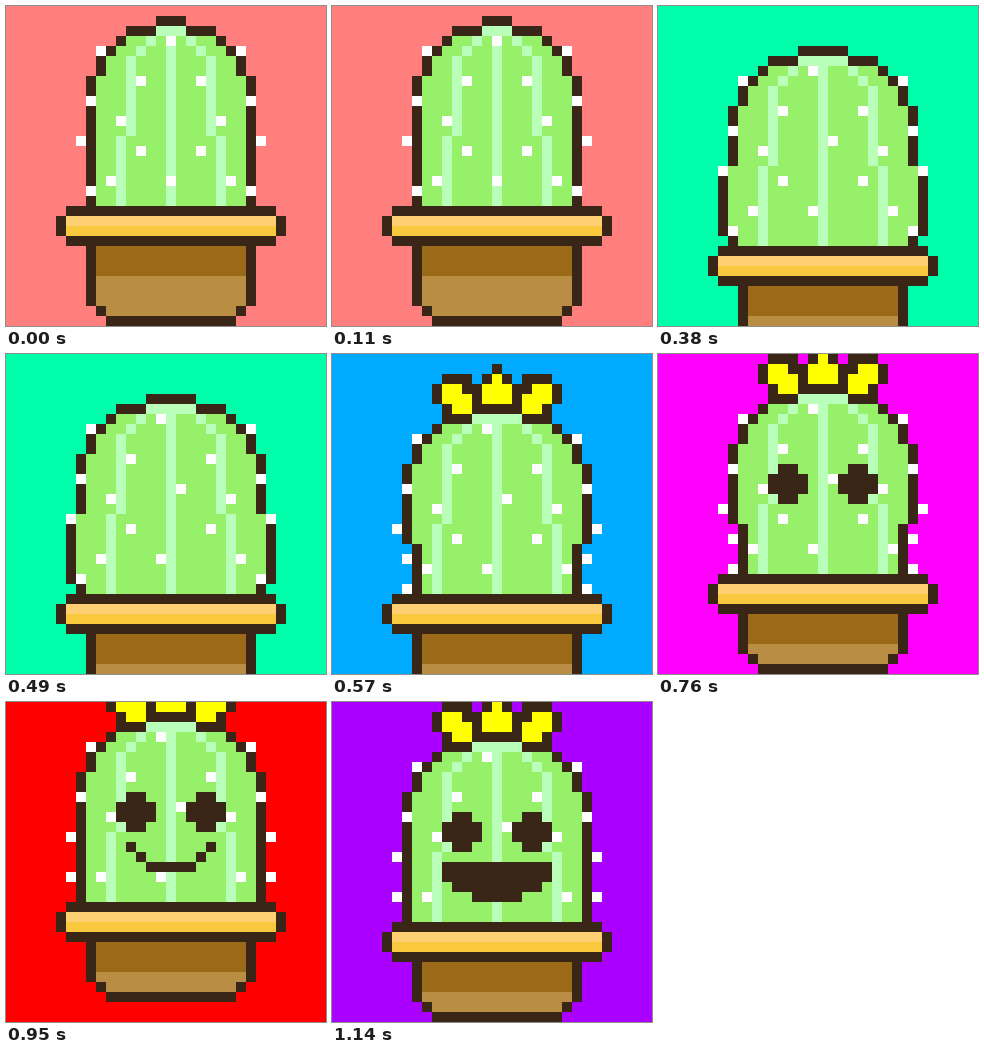
An HTML page with a canvas for the animation above (1.33 s loop, 320 by 320 pixels).

```html
<!DOCTYPE html>
<html lang="en">
<head>
<meta charset="utf-8">
<title>Dancing cactus</title>
<style>
  html, body { margin: 0; width: 100%; height: 100%; overflow: hidden; }
  canvas { display: block; width: 320px; height: 320px; }
</style>
</head>
<body>
<canvas id="stage" width="320" height="320"></canvas>
<script>
const ctx = document.getElementById('stage').getContext('2d');
ctx.scale(10, 10);

const STEP = 190;
const MID = 16;
const DARK = '#3a2616', GREEN = '#96f06a', LIGHT = '#b9ffba', WHITE = '#ffffff';
const YELLOW = '#ffff00', RIM_TOP = '#ffcf73', RIM_LOW = '#f9c83c';
const POT_TOP = '#9b6a18', POT_LOW = '#ba8d44';

// top: first row of the body, crown: half width of its tip, rim: top row of the pot,
// hip: edge offset by row below the top, low: lowest spines as [offset, row]
const straight = () => 0;
const bulge = r => (r > 10 && r < 18 ? 1 : 0);
const waist = r => (r > 12 ? -1 : 0);

const poses = [
  { bg: '#ff7f7f', top: 2, crown: 1, rim: 20, pot: 8, hip: straight, low: [[8, 16]] },
  { bg: '#ff5500', top: 6, crown: 2, rim: 24, pot: 8, hip: straight, low: [[9, 16]] },
  { bg: '#00ffaa', top: 5, crown: 2, rim: 24, pot: 8, hip: bulge, low: [[9, 17]] },
  { bg: '#00aaff', top: 6, crown: 2, rim: 24, pot: 8, hip: waist, low: [[9, 14], [9, 17]], flower: true },
  { bg: '#ff00ff', top: 4, crown: 2, rim: 22, pot: 6, hip: waist, low: [[9, 14], [9, 17]], flower: true, eyes: true },
  { bg: '#ff0000', top: 2, crown: 2, rim: 20, pot: 6, hip: straight, low: [[10, 15]], flower: true, eyes: true, mouth: smile },
  { bg: '#aa00ff', top: 4, crown: 2, rim: 22, pot: 6, hip: straight, low: [[10, 15]], flower: true, eyes: true, mouth: laugh }
];

function box(color, x, y, w = 1, h = 1) {
  ctx.fillStyle = color;
  ctx.fillRect(x, y, w, h);
}

// Same box on both sides of the middle column
function pair(color, off, y, w = 1, h = 1) {
  box(color, MID - off - w + 1, y, w, h);
  box(color, MID + off, y, w, h);
}

// Box centred on the middle column
function bar(color, half, y, h = 1) {
  box(color, MID - half, y, half * 2 + 1, h);
}

function drawBody({ top, crown, rim, hip }) {
  bar(DARK, crown, top - 1);
  pair(DARK, crown + 1, top, 3);
  bar(LIGHT, crown, top);
  const shoulder = [0, 4, 5, 6, 6];
  for (let y = top + 1; y < rim; y++) {
    const r = y - top;
    const edge = crown + (shoulder[r] || 7 + hip(r));
    const stripe = crown + (r < 3 ? r : r < 11 ? 3 : 4);
    bar(GREEN, edge, y);
    pair(DARK, edge, y);
    pair(LIGHT, stripe, y);
    box(LIGHT, MID, y);
  }
}

function drawSpines({ top, crown, low }) {
  const spots = [[2, 5], [4, 9], [2, 12], [5, 15], [6, 2], [7, 7], [8, 11]];
  spots.forEach(([off, r]) => pair(WHITE, crown + off, top + r));
  low.forEach(([off, r]) => pair(WHITE, off, top + r));
  const x = MID + 1 - crown;
  box(WHITE, x, top + 1);
  box(WHITE, x, top + 15);
  if (crown > 1) box(WHITE, MID + 1, top + 8);
}

function drawFlower(top) {
  const y = top - 5;
  box(DARK, MID, y);
  bar(DARK, 1, y + 1);
  bar(DARK, 2, y + 2, 3);
  box(YELLOW, MID, y + 1);
  bar(YELLOW, 1, y + 2, 2);
  pair(DARK, 3, y + 1, 3);
  pair(DARK, 3, y + 2, 4, 2);
  pair(DARK, 5, y + 4);
  pair(YELLOW, 4, y + 2, 2);
  pair(YELLOW, 3, y + 3, 3);
  pair(YELLOW, 3, y + 4, 2);
}

function drawEyes(top) {
  pair(DARK, 3, top + 7, 2, 4);
  pair(DARK, 2, top + 8, 4, 2);
}

function smile(top) {
  pair(DARK, 4, top + 12);
  pair(DARK, 3, top + 13);
  bar(DARK, 2, top + 14);
}

function laugh(top) {
  bar(DARK, 5, top + 12, 2);
  bar(DARK, 4, top + 14);
  bar(DARK, 2, top + 15);
}

function drawPot({ rim, pot }) {
  const y = rim + 4;
  bar(DARK, 10, rim, 4);
  bar(DARK, 11, rim + 1, 2);
  bar(RIM_TOP, 10, rim + 1);
  bar(RIM_LOW, 10, rim + 2);
  bar(DARK, 8, y, pot - 2);
  bar(DARK, 7, y + pot - 2);
  bar(DARK, 6, y + pot - 1);
  bar(POT_TOP, 7, y, 3);
  bar(POT_LOW, 7, y + 3, pot - 5);
  bar(POT_LOW, 6, y + pot - 2);
}

function draw(pose) {
  box(pose.bg, 0, 0, 32, 32);
  drawBody(pose);
  drawSpines(pose);
  if (pose.flower) drawFlower(pose.top);
  if (pose.eyes) drawEyes(pose.top);
  if (pose.mouth) pose.mouth(pose.top);
  drawPot(pose);
}

let start;
function tick(now) {
  start ??= now;
  const i = Math.floor(Math.max(0, now - start) / STEP) % poses.length;
  draw(poses[i]);
  requestAnimationFrame(tick);
}
draw(poses[0]);
requestAnimationFrame(tick);
</script>
</body>
</html>
```
